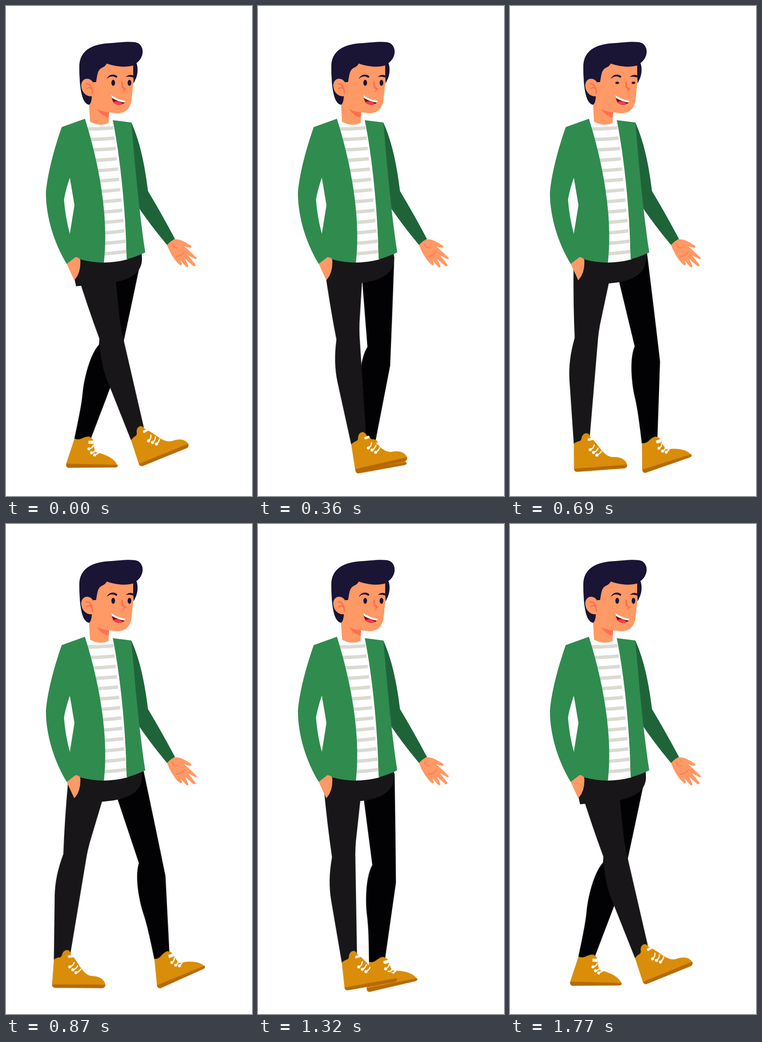
An HTML page for the animation above (1800 ms loop, 530 by 1056 pixels).

```html
<!DOCTYPE html>
<html lang="en">
<head>
<meta charset="utf-8">
<title>Walking man</title>
<style>
  html, body { margin: 0; width: 100%; height: 100%; overflow: hidden; background: #fff; }
  svg { display: block; width: 100%; height: 100%; }

  .hair { fill: #1a1435; }
  .skin { fill: #ff9965; }
  .blush { fill: #ff7050; }
  .crease { fill: none; stroke: #ff7050; stroke-width: 2; stroke-linecap: round; }
  .jacket { fill: #308b4f; }
  .sleeve { fill: #1f6439; }
  .trousers { fill: #181619; }
  .shade { fill: #020204; }
  .shoe { fill: #d98d09; }
  .sole { fill: #b56a08; }
  .white { fill: #fff; }
  .stripes { fill: none; stroke: #dbdad2; stroke-width: 7.5; }
  .laces { fill: none; stroke: #fff; stroke-width: 2.6; stroke-linecap: round; }

  .leg, .eye { animation: 1800ms infinite; }
  .near { transform-origin: 179px 518px; animation-name: swing-near; }
  .far { transform-origin: 246px 526px; animation-name: swing-far; }
  .eye { transform-box: fill-box; transform-origin: center; animation-name: blink; }

  /* 30 ms ticks: 30 out, 29 back, one tick of rest */
  @keyframes swing-near {
    0% { transform: rotate(-19.2deg); animation-timing-function: steps(30); }
    50% { transform: rotate(4deg); animation-timing-function: steps(29); }
    98.3333%, 100% { transform: rotate(-19.2deg); }
  }
  @keyframes swing-far {
    0% { transform: rotate(20.35deg); animation-timing-function: steps(30); }
    50% { transform: rotate(-4.25deg); animation-timing-function: steps(29); }
    98.3333%, 100% { transform: rotate(20.35deg); }
  }
  @keyframes blink {
    0%, 33.3333% { transform: none; animation-timing-function: steps(4); }
    40% { transform: scaleY(.2); animation-timing-function: steps(4); }
    46.6667%, 100% { transform: none; }
  }
</style>
</head>
<body>
<svg viewBox="0 0 530 1056">
  <!-- far arm -->
  <path class="sleeve" d="M270 251C290 295 300 350 306 399Q336 449 364 502L347 515Q314 476 284 432L270 413Z"/>
  <path class="skin" d="M347 515Q354 507 362 503Q373 502 384 508L398 516Q402 521 396 521L384 518Q398 530 410 542Q413 547 407 545L392 537L408 557Q409 563 403 560L386 545L393 560Q393 566 387 561L376 548L379 556Q378 561 373 557C361 545 353 531 347 515Z"/>
  <path class="crease" style="stroke-width:1.5" d="M359 513Q361 523 370 521M366 540Q378 539 385 529"/>

  <g class="leg far">
    <path class="shade" d="M240 515L285 515L295.500 532Q314 655 329.500 764L328 942L295 943C289 902 284 868 277 842C268 806 264 757 274 733L237 595L230 565Z"/>
    <path class="shoe" d="M295 941Q304 942 311 934Q318 927 324 926Q333 927 336 934Q341 946 348 953C372 949 392 952 403 964L402 967L300 1003L297 998Z"/>
    <path class="sole" d="M297 998L402 962Q404 967 399 969L304 1005Q298 1005 297 998Z"/>
    <path class="white" d="M325 935L335 931L337 938L327 941Z"/>
    <path class="laces" d="M332 951Q338 948 338 941M340 957Q345 955 346 949M348 959L354 953"/>
    <g class="white"><circle cx="332" cy="951" r="3.2"/><circle cx="340" cy="957" r="3.2"/><circle cx="348" cy="959" r="3.2"/></g>
  </g>

  <g class="trousers">
    <path d="M152 530L148 590L151 604L212 598C262 594 293 578 293 545L292 525Z"/>
    <g class="leg near">
      <path d="M136 555Q133 640 134.500 714C124 748 120 775 121 806L127 944L161 935L185 715Q187 700 190 686L211 598L218 570L200 520L150 530Z"/>
      <path class="shoe" d="M127 942Q135 937 139 937Q144 935 144 930Q147 920 155 920Q161 921 163 929Q172 937 178 946C188 960 197 973 212 973C230 973 239 981 241 991L236 996L130 1001L126 996Z"/>
      <path class="sole" d="M126 996L241 990Q241 997 234 998L133 1003Q126 1003 126 996Z"/>
      <path class="white" d="M157 932L168 930L169 935L158 937Z"/>
      <path class="laces" d="M162 956Q169 954 171 946M169 962Q176 960 179 953M176 968Q182 966 186 960"/>
      <g class="white"><circle cx="162" cy="956" r="3.2"/><circle cx="169" cy="962" r="3.2"/><circle cx="176" cy="968" r="3.2"/></g>
    </g>
  </g>

  <!-- shirt and jacket -->
  <clipPath id="torso"><path d="M170 243L230 246L262 546Q236 553 208 553Z"/></clipPath>
  <g clip-path="url(#torso)">
    <rect class="white" x="165" y="240" width="100" height="315"/>
    <path class="stripes" id="stripes"/>
  </g>
  <path class="jacket" d="M170 243L120 261C102 313 89 364 86 403C86 456 105 514 131 556L151 541L160 546Q185 553 211 553C224 440 192 312 170 243Z"/>
  <path class="white" d="M137.500 370C132 386 127 404 125 417C127 445 132 470 137.500 491L147.500 429Z"/>
  <path class="jacket" d="M230 246L270 251C277 330 285 430 300 531Q281 540 260 546C258 440 246 325 230 246Z"/>
  <path class="skin" d="M131 556Q142 547 150 541Q158 542 160 547Q162 575 147 591Z"/>

  <!-- head -->
  <path class="hair" d="M158 130C158 165 161 195 170 207Q176 215 184 212L196 160Z"/>
  <path class="skin" d="M190 130L218 120L276 125L275 158L270.500 202C268 222 256 232 238 231L222 229L221 252Q201 261 181 249L179 213Q184 210 185 195Z"/>
  <path class="blush" d="M196 222Q208 228 222 229L221 241Q205 236 196 222Z"/>
  <path class="hair" d="M158 135C156 98 182 82 225 80C250 78 262 76 278 78C291 80 296 92 294 103C292 114 285 120 281 123C285 132 284 147 280 156L275 167L274 150L274 128C258 133 238 131 217 124Q214 130 207 133C196 138 197 151 194 164L184 164L160 170Z"/>
  <path class="skin" d="M187 164C180 153 163 154 162 171C163 188 175 197 188 194Z"/>
  <path class="crease" style="stroke-width:3" d="M173 168C181 166 186 177 186 188M174 178Q179 174 184 178"/>
  <g class="hair">
    <path d="M217 157C222 147 233 145 240 152L238 155C230 150 224 151 217 157Z"/>
    <path d="M258 153Q266 146 274 150L274 154Q266 151 258 153Z"/>
    <ellipse class="eye" cx="231" cy="165.5" rx="4" ry="6.5"/>
    <ellipse class="eye" cx="266" cy="165.5" rx="4" ry="6.5"/>
  </g>
  <path class="blush" d="M248 163L251.500 163L253 174L260 179L250 186L254 180L249 176Z"/>
  <path fill="#730f18" d="M227 193C236 200 247 204 258 205Q254 213 243 213Q229 212 227 193Z"/>
  <path fill="#f83b4b" d="M230 207.500Q238 204 244 206Q249 208 252 211Q240 216 230 207.500Z"/>
  <path class="white" d="M227 192C236 199 248 203 258 204.500L256 208C246 207 236 203 228 198Z"/>
</svg>
<script>
  const stripe = (_, i) => {
    const y = 265 + 22.5 * i;
    return `M165 ${y}Q215 ${y + 1} 265 ${y - 7}`;
  };
  document.getElementById('stripes')
    .setAttribute('d', Array.from({ length: 13 }, stripe).join(''));
</script>
</body>
</html>
```
